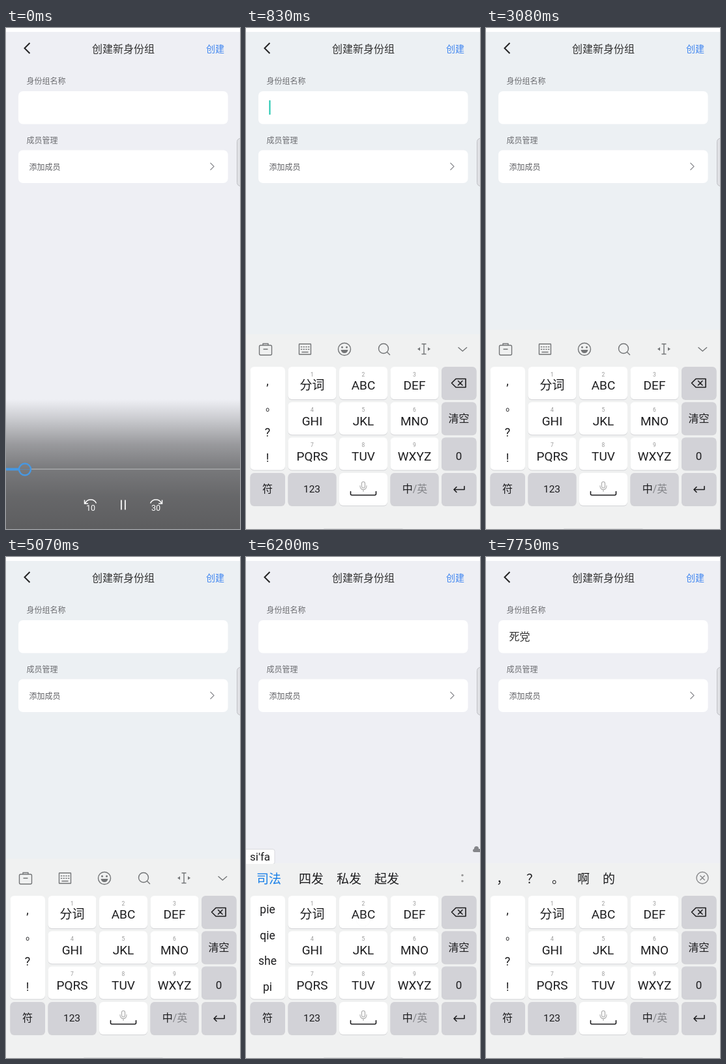
Write an HTML page that moves like this. It is 359 px wide and 769 px high and loops after 8000 ms.

```html
<!DOCTYPE html>
<html lang="zh-CN">
<head>
<meta charset="utf-8">
<style>
html, body { margin: 0; width: 100%; height: 100%; overflow: hidden; background: #fff; }
svg { display: block; width: 359px; height: 769px; }
text { font-family: Roboto, "Noto Sans CJK SC", "Noto Sans CJK", sans-serif; white-space: pre; }
.icon { fill: none; stroke: #737577; stroke-width: 1.4; stroke-linecap: round; stroke-linejoin: round; }
</style>
</head>
<body>
<svg id="stage" viewBox="0 0 359 769"></svg>
<script>
const LOOP = 8000;
const DARK = '#1d1d1f', BLUE = '#147de8';

const rect = (x, y, w, h, fill, r = 0, more = '') =>
  `<rect x="${x}" y="${y}" width="${w}" height="${h}" rx="${r}" fill="${fill}" ${more}/>`;
const text = (x, y, size, str, fill = DARK, anchor = 'middle', more = '') =>
  `<text x="${x}" y="${y + size * 0.37}" font-size="${size}" fill="${fill}" text-anchor="${anchor}" ${more}>${str}</text>`;
const path = (d, more = '') => `<path d="${d}" ${more}/>`;
const dot = (x, y, r, fill) => `<circle cx="${x}" cy="${y}" r="${r}" fill="${fill}"/>`;

// Keyboard layout
const colX = [6.5, 64.5, 143, 221.5, 300], colW = [53.5, 74, 74, 74, 53.5];
const rowY = row => 520 + row * 54.3;
const labels = ['分词', 'ABC', 'DEF', 'GHI', 'JKL', 'MNO', 'PQRS', 'TUV', 'WXYZ'];
const center = col => colX[col] + colW[col] / 2;

function key(col, row, fill, height = 50, id = '') {
  const x = colX[col], y = rowY(row), w = colW[col];
  return rect(x, y + 1, w, height, '#d2d3d6', 6) + rect(x, y, w, height, fill, 6, id && `id="${id}"`);
}

function keys() {
  const gray = '#d2d2d7';
  let out = key(0, 0, '#fff', 158.5);
  labels.forEach((label, i) => {
    const col = 1 + i % 3, row = Math.floor(i / 3), x = center(col), y = rowY(row);
    out += key(col, row, '#fff', 50, 'key' + i)
      + text(x, y + 11.5, 8.5, i + 1, '#999') + text(x, y + 28.2, 19, label);
  });
  for (let row = 0; row < 4; row++) out += key(4, row, gray);
  out += key(0, 3, gray) + key(1, 3, gray) + key(2, 3, '#fff') + key(3, 3, gray);
  out += text(326.5, 599, 16, '清空') + text(326.5, 656.5, 17, '0') + text(33, 707.5, 16, '符')
    + text(101, 707.5, 15.5, '123')
    + text(259, 707.5, 16, '中<tspan fill="#85868a">/英</tspan>');
  const ink = `class="icon" style="stroke:${DARK};stroke-width:1.6"`;
  out += path('M322 538.500H337V551.500H322L315.500 545ZM325.500 541.800l6.500 6.500m0-6.500l-6.500 6.500', ink)
    + path('M335 703.500V708.500H319m4-4l-4 4 4 4', ink)
    + path('M160.500 711.500v3.500q0 2 2 2h35q2 0 2-2v-3.500', ink)
    + rect(177.5, 696.5, 5, 9.5, 'none', 2.5, 'stroke="#aaa" stroke-width="1.1"')
    + path('M175 702.500q0 6 5 6t5-6M180 708.500v3', 'class="icon" style="stroke:#aaa;stroke-width:1.1"');
  return out + rect(119, 768, 122, 3, '#dadbdd', 1.5);
}

function toolbar() {
  let dots = '';
  for (let i = 0; i < 8; i++) dots += `M${84.5 + i % 4 * 3.7} ${489.5 + Math.floor(i / 4) * 3.7}h1.200`;
  return `<g class="icon">` + path(
    'M22.500 487h15q2 0 2 2v11q0 2-2 2h-15q-2 0-2-2v-11q0-2 2-2ZM26 487v-2.500h8V487M27 493h6' +
    'M82 485h17q.500 0 .500.500v15q0 .500-.500.500H82q-.500 0-.500-.500v-15q0-.500.500-.500ZM86 497.500h9' + dots +
    'M273 485v15.500M270 485h6M270 500.500h6M326 490.500l6.300 5.500 6.300-5.500M216.500 497.500l4 4')
    + '<circle cx="151" cy="493" r="9.5"/><circle cx="211" cy="492" r="7.5"/></g>'
    + dot(147.5, 490, 1.5, '#737577') + dot(154.5, 490, 1.5, '#737577')
    + path('M145.500 494h11q-1 5-5.500 5t-5.500-5Z', 'fill="#737577"')
    + path('M267 490v5.500l-4-2.750zM279 490v5.500l4-2.750z', 'fill="#737577"');
}

function candidates(words, firstColor) {
  let x = 16, out = '';
  words.forEach((word, i) => {
    out += text(x, 493.5, 19, word, i ? DARK : firstColor, 'start', 'font-weight="500"');
    x += word.length * 19 + (i ? 20 : 27);
  });
  return `<g clip-path="url(#strip)">${out}</g>`;
}

const punctuation = text(33, 541.5, 18, ',') + text(30, 581, 16, '。', DARK, 'start')
  + text(33, 620, 18, '?') + text(33, 659, 18, '!');
const syllables = list => list.split(' ').map((s, i) => text(33, 541 + i * 39.4, 17.5, s)).join('');

function composing(letters, words, side, width) {
  return rect(-4, 448.5, width + 4, 23, '#fff', 3, 'stroke="#d9dade"')
    + rect(0, 471, 359, 6, '#f0f1f1')
    + text(6, 460, 17, letters, DARK, 'start')
    + candidates(words.split(' '), BLUE) + syllables(side)
    + dot(332, 488.5, 1.7, '#999') + dot(332, 497.5, 1.7, '#999');
}

// Contents of the strip and side list, with the time each one appears
const states = [
  [0, toolbar() + punctuation],
  [5440, composing('p', '其 去 人 请 上 却 却 期', 'p q r s', 20)],
  [5650, composing('si', '四 私 势 是 死 起 气 日', 'pi qi ri si', 25)],
  [5940, composing('she', '设 些 社 且 射 切 蛇 舍', 'pie qie she pi', 39)],
  [6030, composing("si'fa", '司法 四发 私发 起发', 'pie qie she pi', 44)],
  [6290, composing("si'fan", '四番 私贩 起飞 四凡', 'pie qie she pi', 53)],
  [6440, composing("si'fang", '四方 死党 私房 期房 四房', 'pie qie she pi', 61.5)],
  [7260, candidates('， ？ 。 啊 的'.split(' '), DARK) + punctuation
    + '<circle class="icon" cx="332" cy="492.5" r="9" style="stroke:#88898b"/>'
    + path('M328.800 489.300l6.500 6.500m0-6.500l-6.500 6.500', 'class="icon" style="stroke:#88898b"')],
];

// x, y, press, release, key index
const taps = [
  [158, 136, 560, 610], [101, 655, 5400, 5440, 6], [102, 606, 5600, 5650, 3],
  [240, 567, 5830, 5940, 2], [180, 556, 5990, 6030, 1], [252, 606, 6230, 6290, 5],
  [102, 606, 6400, 6440, 3], [99, 494, 7210, 7260],
];
const caretOn = [[610, 1100], [1600, 2090], [2580, 3080], [3580, 4070], [4580, 5070],
  [5440, 5940], [6440, 6940], [7260, 7750]];

const skip = (x, seconds, flip) =>
  `<g transform="translate(${x} 732)">`
  + path('M-8.500-2.500Q-6-8 0-8T8.500-2.500M-9.500-7.500v5.500h5.500',
    `fill="none" stroke="#fff" stroke-width="1.5" transform="scale(${flip} 1)"`)
  + text(0, 4.5, 12.5, seconds, '#fff') + '</g>';

const shades = [[0, 0], [.15, .15], [.35, .36], [.55, .5], [.75, .57], [1, .61]];

document.getElementById('stage').innerHTML = `
<defs>
  <clipPath id="strip"><rect x="0" y="470" width="304" height="48"/></clipPath>
  <linearGradient id="shade" x2="0" y2="1">
    ${shades.map(([at, a]) => `<stop offset="${at}" stop-opacity="${a}"/>`).join('')}
  </linearGradient>
</defs>`
  + rect(0, 0, 359, 769, '#fff') + rect(0, 6, 359, 763, '#eeeff4', 0, 'id="page"')
  + path('M36.500 23l-8 8 8 8', 'fill="none" stroke="#222" stroke-width="2"')
  + text(180, 32, 16, '创建新身份组', '#333') + text(321, 32, 14, '创建', '#3f85f0')
  + text(31.5, 81.8, 12, '身份组名称', '#6c6d71', 'start') + text(31.5, 172.6, 12, '成员管理', '#6c6d71', 'start')
  + rect(19, 97, 321.5, 50.5, '#fff', 7) + rect(19, 187.5, 321.5, 50.5, '#fff', 7)
  + text(35.5, 213.4, 12, '添加成员', '#5e5f63', 'start')
  + path('M313.500 207l5.500 5.500-5.500 5.500', 'fill="none" stroke="#8b8c90" stroke-width="1.2"')
  + text(35.5, 122.5, 16, '死党', '#333', 'start', 'id="entry"')
  + rect(35.5, 111, 2, 22, '#1cc5ae', 0, 'id="caret"')
  + `<g id="keyboard">${rect(0, 470, 359, 310, '#f0f1f1', 0, 'id="board"')}<g id="face">${keys()}`
  + states.map(([, body], i) => `<g id="state${i}">${body}</g>`).join('') + '</g></g>'
  + `<g id="cloud">${dot(353.5, 447.5, 3.5, '#85868a')}${rect(348, 448, 13, 5, '#85868a', 2.5)}</g>`
  + `<g id="player">${rect(0, 570, 359, 199, 'url(#shade)')}`
  + rect(39, 676.5, 320, 1.2, '#b4b5b7') + rect(0, 675.3, 20, 4, '#4798e2')
  + '<circle cx="29" cy="677.5" r="9" fill="none" stroke="#4798e2" stroke-width="2.4"/>'
  + rect(20, 677, 18, 1, '#4798e2', 0, 'opacity=".5"')
  + skip(130, 10, 1) + skip(230, 30, -1)
  + rect(176, 724.5, 1.7, 15, '#fff') + rect(182, 724.5, 1.7, 15, '#fff') + '</g>'
  + rect(354.5, 169.5, 12, 73, '#e0e1e5', 5, 'stroke="#bfc0c5"')
  + '<circle id="touch" r="11" fill="#fff" fill-opacity=".6" stroke="#b4b8cc"/>';

const el = id => document.getElementById(id);
const set = (id, name, value) => el(id).setAttribute(name, value);
const show = (id, on) => { el(id).style.display = on ? '' : 'none'; };
const clamp = v => Math.min(1, Math.max(0, v));

function render(t) {
  const raised = t >= 640;
  set('page', 'height', raised ? 464 : 763);
  set('page', 'fill', t >= 800 && t < 5400 ? '#ecf0f3' : '#eeeff4');
  set('board', 'y', t >= 860 && t < 5440 ? 463 : 470);

  const rise = clamp((t - 640) / 185);
  show('keyboard', raised);
  set('keyboard', 'transform', `translate(0 ${208 * (1 - rise) ** 1.4})`);
  set('face', 'opacity', clamp((t - 600) / 190));

  const current = states.filter(([start]) => t >= start).length - 1;
  states.forEach((_, i) => show('state' + i, i === current));

  show('entry', t >= 7260);
  show('caret', caretOn.some(([from, to]) => t >= from && t < to));
  set('caret', 'x', t >= 7260 ? 67.5 : 35.5);
  show('cloud', t >= 5980 && t < 6790);
  set('player', 'opacity', clamp((810 - t) / 570));

  labels.forEach((_, i) => set('key' + i, 'fill',
    taps.some(([, , , up, k]) => k === i && t >= up && t < up + 80) ? '#dedfe3' : '#fff'));
  const tap = taps.filter(([, , down]) => t >= down).pop();
  show('touch', tap);
  if (tap) {
    set('touch', 'cx', tap[0]);
    set('touch', 'cy', tap[1]);
    set('touch', 'opacity', clamp(1 - (t - tap[3]) / 180));
  }
}

const start = performance.now();
function frame() {
  render((performance.now() - start) % LOOP);
  requestAnimationFrame(frame);
}
frame();
</script>
</body>
</html>
```
